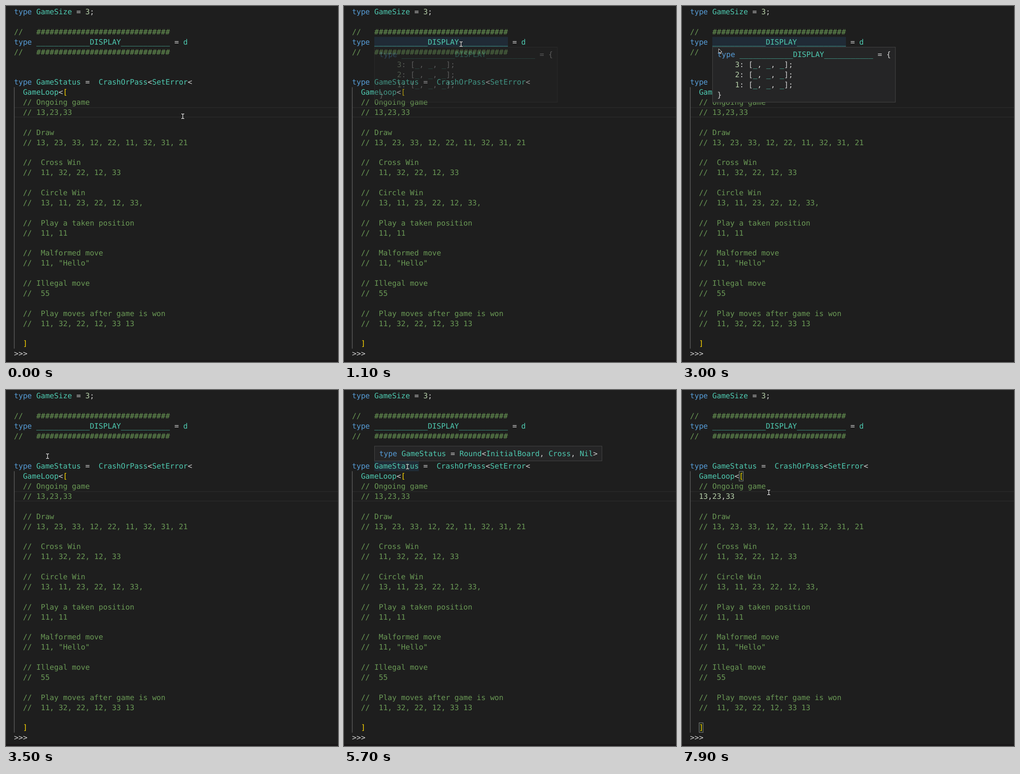
Animation, 723 px wide and 775 px high, one loop 8000 ms. Source, as an HTML page:

```html
<!DOCTYPE html>
<html lang="en">
<head>
<meta charset="utf-8">
<title>Type-level game</title>
<style>
  html, body { margin: 0; width: 100%; height: 100%; overflow: hidden; background: #1e1e1e; }
  svg { display: block; width: 100vw; height: 100vh; }
  text {
    font: 16.11px "DejaVu Sans Mono", monospace;
    white-space: pre;
    text-rendering: geometricPrecision;
    fill: #d4d4d4;
  }
  .key { fill: #569cd6; }
  .type { fill: #4ec9b0; }
  .num { fill: #b5cea8; }
  .note { fill: #6a9955; }
  .gold { fill: #ffd700; }
  .word { fill: #202b36; }
  .line { fill: #2a2a2a; }
  .guide { fill: #707070; }
  .edge { fill: #191718; }
  .caret { fill: #aeafad; }
  .tip rect { fill: #252526; stroke: #454545; }
  .match rect { fill: #1b251b; stroke: #888; }
</style>
</head>
<body>
<svg id="stage" viewBox="0 0 723 775"></svg>
<script>
const LEFT = 17.5, TOP = 1.6, CHAR = 9.7, ROW = 21.89, BASE = 16.4;
const LOOP = 8000, STEP = 100;
const hashes = '//   ' + '#'.repeat(30);
const display = '_'.repeat(12) + 'DISPLAY' + '_'.repeat(11);

const lines = [
  'type GameSize = 3;', '',
  hashes, `type ${display} = d`, hashes, '', '',
  'type GameStatus =  CrashOrPass<SetError<',
  '  GameLoop<[',
  '  // Ongoing game', '', '',
  '  // Draw', '  // 13, 23, 33, 12, 22, 11, 32, 31, 21', '',
  '  //  Cross Win', '  //  11, 32, 22, 12, 33', '',
  '  //  Circle Win', '  //  13, 11, 23, 22, 12, 33,', '',
  '  //  Play a taken position', '  //  11, 11', '',
  '  //  Malformed move', '  //  11, "Hello"', '',
  '  // Illegal move', '  //  55', '',
  '  //  Play moves after game is won', '  //  11, 32, 22, 12, 33 13', '',
  '  ]', '>>>'
];
const displayTip = [`type ${display} = {`,
  ...[3, 2, 1].map(n => `    ${n}: [_, _, _];`), '}'];
const statusTip = ['type GameStatus = Round<InitialBoard, Cross, Nil>'];

const colX = c => LEFT + CHAR * c;
const rowY = r => TOP + ROW * r;

const escape = s => s.replace(/</g, '&lt;').replace(/>/g, '&gt;');
const span = (cls, s) => `<tspan class="${cls}">${s}</tspan>`;

function paint(line, bracketClass) {
  if (line.trim().startsWith('//')) return span('note', line);
  return line.replace(/(\btype\b)|([A-Z_]\w*|\bd\b)|(\d+)|([[\]])|[<>]/g,
    (s, key, type, num, bracket) =>
      key ? span('key', s) : type ? span('type', s) : num ? span('num', s) :
      bracket ? span(bracketClass, s) : escape(s));
}

const text = (line, x, top, bracketClass, id = '') => line &&
  `<text xml:space="preserve" id="${id}" x="${x}" y="${Math.round(top + BASE)}">${paint(line, bracketClass)}</text>`;
const code = (line, r, id) => text(line, LEFT, rowY(r), 'gold', id);
const rect = (x, y, w, h, cls = '', id = '') =>
  `<rect id="${id}" class="${cls}" x="${x}" y="${y}" width="${w}" height="${h}"/>`;
const word = (r, s, id) => rect(colX(5), rowY(r), CHAR * s.length, ROW, 'word', id);
const bracketBox = (c, r) => rect(colX(c) + .4, rowY(r) + .5, CHAR - 1, ROW - 1);

// Hover box sized by its text, hung from column 5
function tip(id, rows, top) {
  const x = colX(5) + .5, pad = 10.3;
  return `<g id="${id}" class="tip">` +
    rect(x, top, CHAR * rows[0].length + 2 * pad - .7, ROW * rows.length + pad) +
    rows.map((s, i) => text(s, x + pad, top + pad / 2 + ROW * i, '')).join('') + '</g>';
}

const beam = 'M-3 -5h1.6L0 -4L1.4 -5H3M0 -4V4M-3 5h1.6L0 4L1.4 5H3';

document.getElementById('stage').innerHTML =
  rect(0, 771, 723, 4, 'edge') +
  rect(18, rowY(10), 705, 1.5, 'line') +
  rect(18, rowY(11) - 1.5, 705, 1.5, 'line') +
  rect(LEFT, rowY(8), 1.1, 26 * ROW, 'guide') +
  word(3, display, 'displayWord') +
  word(7, 'GameStatus', 'statusWord') +
  `<g id="match" class="match">${bracketBox(11, 8)}${bracketBox(2, 33)}</g>` +
  lines.map((s, r) => code(s, r)).join('') +
  code('  // 13,23,33', 10, 'before') +
  code('  13,23,33', 10, 'after') +
  rect(0, rowY(10), 2, ROW, 'caret', 'caret') +
  tip('displayTip', displayTip, rowY(4) + .5) +
  tip('statusTip', statusTip, rowY(7) - ROW - 10.8) +
  `<g id="beam" fill="none"><path d="${beam}" stroke="#000" stroke-width="2.6"/>
   <path d="${beam}" stroke="#fff" stroke-width="1.3"/></g>
   <path id="arrow" d="M0 0V9.5L2.2 7.5L3.8 11L5.4 10.3L3.9 7H7Z" fill="#000" stroke="#fff" stroke-width=".9"/>`;

const el = {};
document.querySelectorAll('[id]').forEach(n => { if (n.id) el[n.id] = n; });

// Pointer moves; "bend" pulls the path into a curve
const start = [385, 240];
const moves = [
  { from: 200, to: 900, end: [255, 83] },
  { from: 2100, to: 2400, end: [237, 79] },
  { from: 2600, to: 3000, end: [80, 93] },
  { from: 3000, to: 3500, end: [90.5, 144], bend: [20, 110] },
  { from: 3500, to: 4400, end: [137, 164] },
  { from: 5600, to: 6400, end: [164, 232] },
  { from: 7800, to: 7900, end: [189, 223] }
];

function pointer(t) {
  let at = start;
  for (const { from, to, end, bend } of moves) {
    if (t <= from) break;
    const u = Math.min(1, (t - from) / (to - from));
    const k = u * u * (3 - 2 * u);
    at = at.map((a, i) => {
      const mid = bend ? bend[i] : (a + end[i]) / 2;
      return a * (1 - k) ** 2 + 2 * mid * k * (1 - k) + end[i] * k * k;
    });
  }
  return at;
}

const within = (t, from, to) => t >= from && t < to;
const show = (node, alpha) => node.setAttribute('opacity', +alpha);

function hover(name, t, from, to) {
  const on = within(t, from, to);
  show(el[name + 'Word'], on);
  show(el[name + 'Tip'], on && (t < from + STEP ? 0.33 : 1));
  return on;
}

function draw(now) {
  const t = Math.floor(now % LOOP / STEP) * STEP;
  const [x, y] = pointer(t);
  const open = hover('display', t, 1100, 3200);
  hover('status', t, 4300, 5800);

  const onTip = open && x > colX(5) && y > rowY(4);
  show(el.beam, !onTip);
  show(el.arrow, onTip);
  for (const node of [el.beam, el.arrow]) node.setAttribute('transform', `translate(${x} ${y})`);

  const edited = t >= 7200;
  show(el.before, !edited);
  show(el.after, edited);
  show(el.match, t >= 6300);
  show(el.caret, within(t, 6300, 6800) || within(t, 7200, 7700));
  el.caret.setAttribute('x', Math.floor(colX(edited ? 10 : 13)));
}

function tick() {
  draw(performance.now());
  requestAnimationFrame(tick);
}
tick();
</script>
</body>
</html>
```
